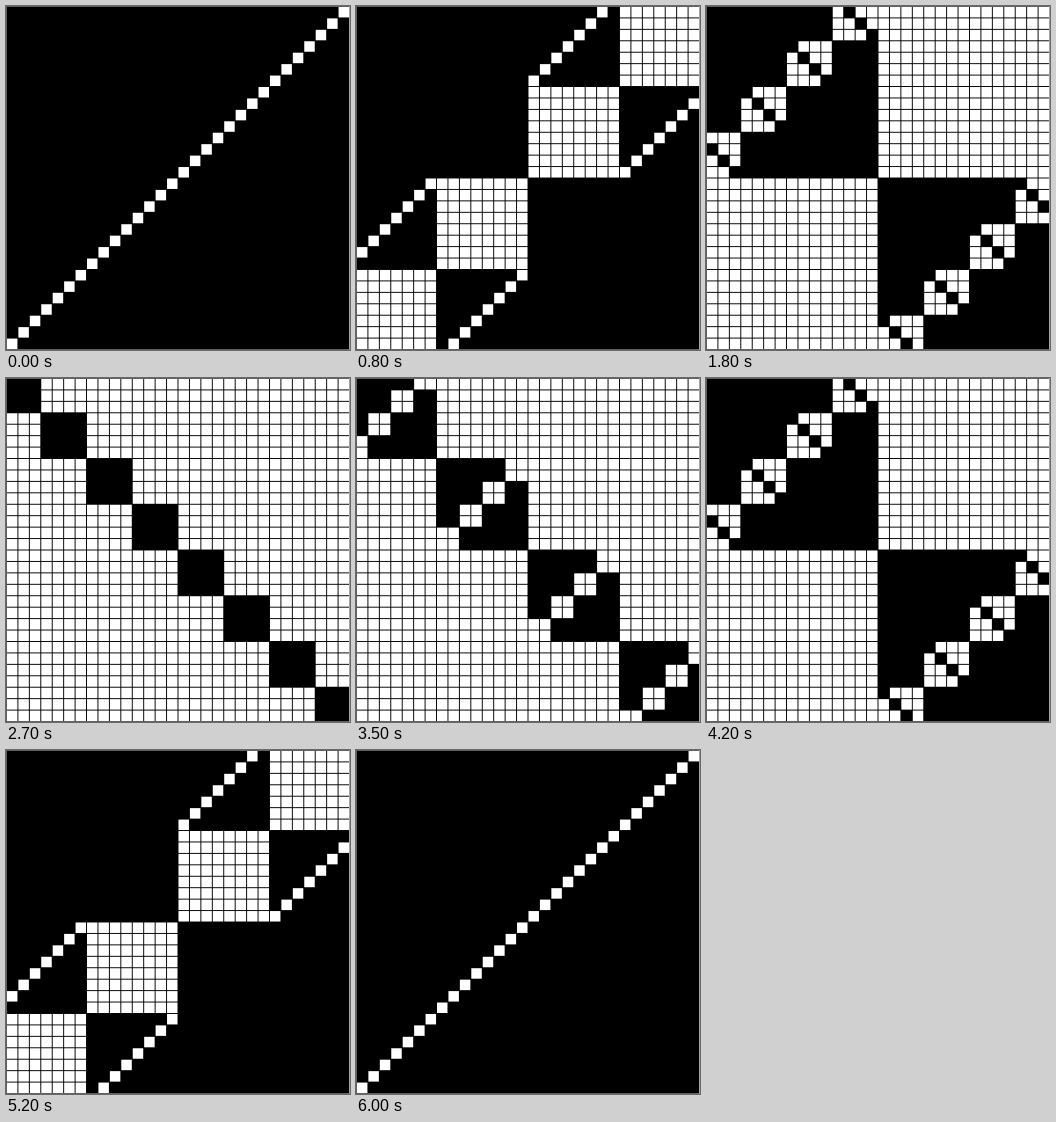
An HTML page without scripts that plays this animation: 344 px wide and 344 px high, repeating every 6100 ms.

```html
<!DOCTYPE html>
<html lang="en">
<head>
<meta charset="utf-8">
<title>XOR threshold</title>
<style>
  @property --step { syntax: "<integer>"; inherits: true; initial-value: 0; }

  html, body { margin: 0; width: 100%; height: 100%; overflow: hidden; background: #000; }

  svg {
    display: block;
    width: 344px;
    height: 344px;
    --b0: 0; --b1: 0; --b2: 0; --b3: 0; --b4: 0;
    animation: count 6.1s steps(61) infinite;
  }
  @keyframes count { from { --step: 0; } to { --step: 61; } }

  /* Each class sets one bit of column XOR row. */
  .b0 { --b0: 1; }
  .b1 { --b1: 2; }
  .b2 { --b2: 4; }
  .b3 { --b3: 8; }
  .b4 { --b4: 16; }

  /* Shown while XOR <= 30 - |step - 30|. */
  .cell {
    fill: #fff;
    --xor: calc(var(--b0) + var(--b1) + var(--b2) + var(--b3) + var(--b4));
    opacity: clamp(0, 31 - max(var(--step) - 30, 30 - var(--step)) - var(--xor), 1);
  }

  .frame { fill: none; stroke: #666; }
  .edge { stroke: #aaa; }
</style>
</head>
<body>
<!-- 30 cells of 11 units, with 1 unit of black between them -->
<svg viewBox="0 0 361 361">
  <defs>
    <rect id="q0" class="cell" width="11" height="11"/>
    <g id="q1">
      <use href="#q0"/><use href="#q0" x="12" y="12"/>
      <use href="#q0" class="b0" x="12"/><use href="#q0" class="b0" y="12"/>
    </g>
    <g id="q2">
      <use href="#q1"/><use href="#q1" x="24" y="24"/>
      <use href="#q1" class="b1" x="24"/><use href="#q1" class="b1" y="24"/>
    </g>
    <g id="q3">
      <use href="#q2"/><use href="#q2" x="48" y="48"/>
      <use href="#q2" class="b2" x="48"/><use href="#q2" class="b2" y="48"/>
    </g>
    <g id="q4">
      <use href="#q3"/><use href="#q3" x="96" y="96"/>
      <use href="#q3" class="b3" x="96"/><use href="#q3" class="b3" y="96"/>
    </g>
  </defs>

  <!-- Values 1 to 30 are on stage; 0 and 31 fall outside. -->
  <g transform="translate(-11 372) scale(1 -1)">
    <use href="#q4"/><use href="#q4" x="192" y="192"/>
    <use href="#q4" class="b4" x="192"/><use href="#q4" class="b4" y="192"/>
  </g>

  <rect class="frame" x=".5" y=".5" width="360" height="360"/>
  <path class="edge" d="M360.5 0V361"/>
</svg>
</body>
</html>
```
